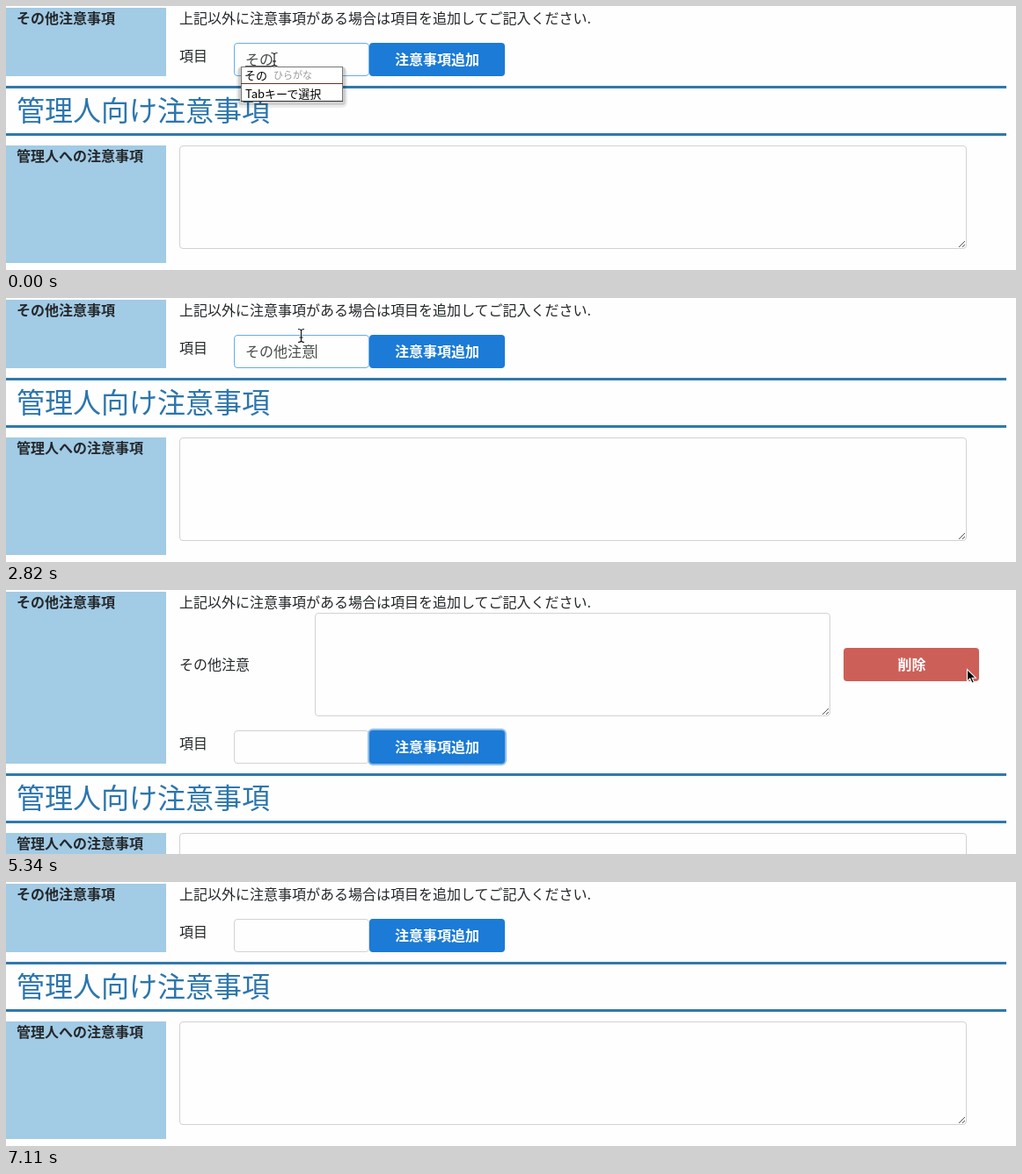
Write an HTML page that moves like this. It is 1148 px wide and 301 px high and loops after 8500 ms.

```html
<!DOCTYPE html>
<html lang="ja">
<head>
<meta charset="utf-8">
<title>注意事項フォーム</title>
<style>
  html, body { margin: 0; width: 100%; height: 100%; overflow: hidden; background: #fefefe; }
  svg { display: block; width: 1148px; height: 301px; }
  text { font-family: "Noto Sans CJK JP", "Noto Sans CJK", "Noto Sans", sans-serif; font-size: 16px; fill: #24282b; }
  .bold { font-weight: 700; }
  .white { fill: #fff; font-weight: 700; }
  .title { font-size: 32px; font-weight: 300; fill: #2c76ad; }
  .field { fill: #fefefe; stroke: #d2d2d2; }
  .typed { fill: #464a4c; }
  .ime { font-size: 13px; fill: #000; }
  .note { font-size: 11px; fill: #999; }
</style>
</head>
<body>
<svg id="stage" viewBox="0 0 1148 301"></svg>
<script>
const LOOP = 8500;
const SHIFT = 118;
const stage = document.getElementById("stage");

// Each track is a list of [start time, value]; values hold until the next entry.
const typing = [
  [0, { text: "その", pre: 0 }],
  [150, { text: "そのた", pre: 0 }],
  [300, { text: "その他", pre: 0 }],
  [590, { text: "その他", caret: 1 }],
  [1190, { text: "その他" }],
  [1640, { text: "その他", caret: 1 }],
  [1790, { text: "その他ｃ", pre: 3 }],
  [1940, { text: "その他ちゅ", pre: 3 }],
  [2080, { text: "その他ちゅう", pre: 3 }],
  [2230, { text: "その他ちゅうい", pre: 3 }],
  [2380, { text: "その他注意", pre: 3 }],
  [2520, { text: "その他注意", caret: 1 }],
  [3270, { text: "その他注意" }],
  [3410, { text: "" }]
];

const popups = [
  [0, { x: 267, w: 116, h: 40, rows: ["その"], note: "ひらがな" }],
  [150, { x: 257, w: 121, h: 51, rows: ["1  その他", "2  そのた"] }],
  [300, null],
  [1940, { x: 310, w: 142, h: 78, rows: ["注意事項", "中", "注文"] }],
  [2230, { x: 310, w: 142, h: 78, rows: ["注意事項", "注意", "注意点"] }],
  [2380, null]
];

const pointer = [
  [0, ["beam", 305, 61]],
  [2820, ["beam", 335.5, 43]],
  [2970, ["arrow", 430, 58]],
  [3120, ["arrow", 464, 65]],
  [3410, ["beam", 464.5, 65]],
  [4900, ["beam", 700, 78]],
  [5040, ["arrow", 1009, 85]],
  [5340, ["arrow", 1092, 90]],
  [5490, ["arrow", 1075, 89]],
  [5640, ["arrow", 1065, 89]],
  [6670, ["beam", 590, 180]],
  [6810, ["beam", 325.5, 257]],
  [7110, null]
];

const rowOpacity = [
  [0, 0], [3410, 0.1], [3560, 0.6], [3700, 0.97], [3850, 1],
  [5780, 0.65], [5930, 0.25], [6070, 0]
];

const addColor = [[0, "#1b7bd6"], [3120, "#1768b3"], [3270, "#155ea2"], [4900, "#1b7bd6"]];
const open = [[0, false], [3410, true], [6220, false]];
const focus = [[0, "input"], [3270, "add"], [5640, "none"]];

function at(track, t) {
  let value = track[0][1];
  for (const [start, v] of track) if (t >= start) value = v;
  return value;
}

const rect = (x, y, w, h, attrs) =>
  `<rect x="${x}" y="${y}" width="${w}" height="${h}" ${attrs}/>`;

// cy is the visual middle of the line of text.
const label = (s, x, cy, cls = "", size = 16) =>
  `<text x="${x}" y="${cy + size * 0.375}" class="${cls}" xml:space="preserve">${s}</text>`;

const field = (x, y, w, h, attrs = "") =>
  rect(x + 0.5, y + 0.5, w - 1, h - 1, `rx="3.5" class="field" ${attrs}`);

function area(x, y, w, h) {
  const r = x + w - 2, b = y + h - 2;
  return field(x, y, w, h) +
    `<path d="M${r - 7} ${b}L${r} ${b - 7}M${r - 3} ${b}L${r} ${b - 3}" stroke="#555" stroke-width="1"/>`;
}

const button = (s, x, y, color, textX) =>
  rect(x, y, 154, 38, `rx="4" fill="${color}"`) + label(s, textX, y + 19, "white");

function drawPopup({ x, w, h, rows, note }) {
  const y = 69, step = h / (rows.length + 1), foot = y + h - step;
  let out = rect(x - 5, y + 1, w + 10, h + 6, 'rx="6" fill="#000" fill-opacity=".07"') +
    rect(x - 3, y, w + 6, h + 4, 'rx="4" fill="#000" fill-opacity=".12"') +
    rect(x + 0.5, y + 0.5, w - 1, h - 1, 'fill="#fff" stroke="#777"');
  rows.forEach((s, i) => out += label(s, x + 4, y + step * (i + 0.5), "ime", 13));
  if (note) out += label(note, x + 37, y + step / 2, "note", 11);
  return out +
    rect(x, Math.round(foot) - 1, w, 1, 'fill="#6b3022"') +
    rect(x, y + h - 1, w, 1, 'fill="#333"') +
    label("Tabキーで選択", x + 5, foot + step / 2 + 1, "ime", 13);
}

function drawPointer([kind, x, y]) {
  if (kind === "beam") {
    const d = "M-3.5-7.5Q-.5-7.5 0-6Q.5-7.5 3.5-7.5M0-6V6M-3.5 7.5Q-.5 7.5 0 6Q.5 7.5 3.5 7.5M-2 2H2";
    return `<g transform="translate(${x} ${y})" fill="none">
      <path d="${d}" stroke="#fff" stroke-width="2.4" stroke-opacity=".6"/>
      <path d="${d}" stroke="#111" stroke-width="1.1"/></g>`;
  }
  return `<path transform="translate(${x} ${y})" d="M.5.5V14L3.7 11L6 16.3L8.4 15.2L6.1 10.2H10.3Z"
    fill="#000" stroke="#fff" stroke-width="1.1"/>`;
}

function drawTyping({ text, pre, caret }, y) {
  const end = 272 + text.length * 16;
  let out = label(text, 272, y, "typed");
  if (pre !== undefined) {
    const start = 272 + pre * 16;
    out += rect(start, y + 7, end - start, 1, 'fill="#555"');
  }
  if (caret) out += rect(end, y - 8, 1, 16, 'fill="#333"');
  return out;
}

function drawRow(opacity, pressed) {
  return `<g opacity="${opacity}">` +
    label("その他注意", 197, 85) +
    area(351, 26, 586, 118) +
    (pressed ? rect(950, 64, 158, 42, 'rx="6" fill="#e5b0ac"') : "") +
    button("削除", 952, 66, pressed ? "#bd5049" : "#cc6058", 1013.5) + "</g>";
}

function draw(t) {
  const dy = at(open, t) ? SHIFT : 0;
  const focused = at(focus, t);
  const opacity = at(rowOpacity, t);
  const popup = at(popups, t);
  const cursor = at(pointer, t);
  const panel = 'fill="#a2cbe5"', rule = 'fill="#2f79ae"';

  stage.innerHTML =
    rect(0, 2, 182, 78 + dy, panel) +
    label("その他注意事項", 12, 14, "bold") +
    label("上記以外に注意事項がある場合は項目を追加してご記入ください.", 197, 14) +
    (opacity ? drawRow(opacity, t >= 5640) : "") +
    label("項目", 197, 57 + dy) +
    field(259, 42 + dy, 154, 38, focused === "input" ? 'style="stroke:#66ade8"' : "") +
    drawTyping(at(typing, t), 61 + dy) +
    (focused === "add" ? rect(411, 40 + dy, 158, 42, 'rx="6" fill="#8ebeea"') : "") +
    button("注意事項追加", 413, 42 + dy, at(addColor, t), 442) +
    rect(0, 91 + dy, 1137, 3, rule) +
    label("管理人向け注意事項", 12, 119 + dy, "title", 32) +
    rect(0, 145 + dy, 1137, 3, rule) +
    rect(0, 159 + dy, 182, 134, panel) +
    label("管理人への注意事項", 12, 171 + dy, "bold") +
    area(197, 159 + dy, 895, 118) +
    (popup ? drawPopup(popup) : "") +
    (cursor ? drawPointer(cursor) : "");
}

function tick() {
  draw(performance.now() % LOOP);
  requestAnimationFrame(tick);
}
tick();
</script>
</body>
</html>
```
